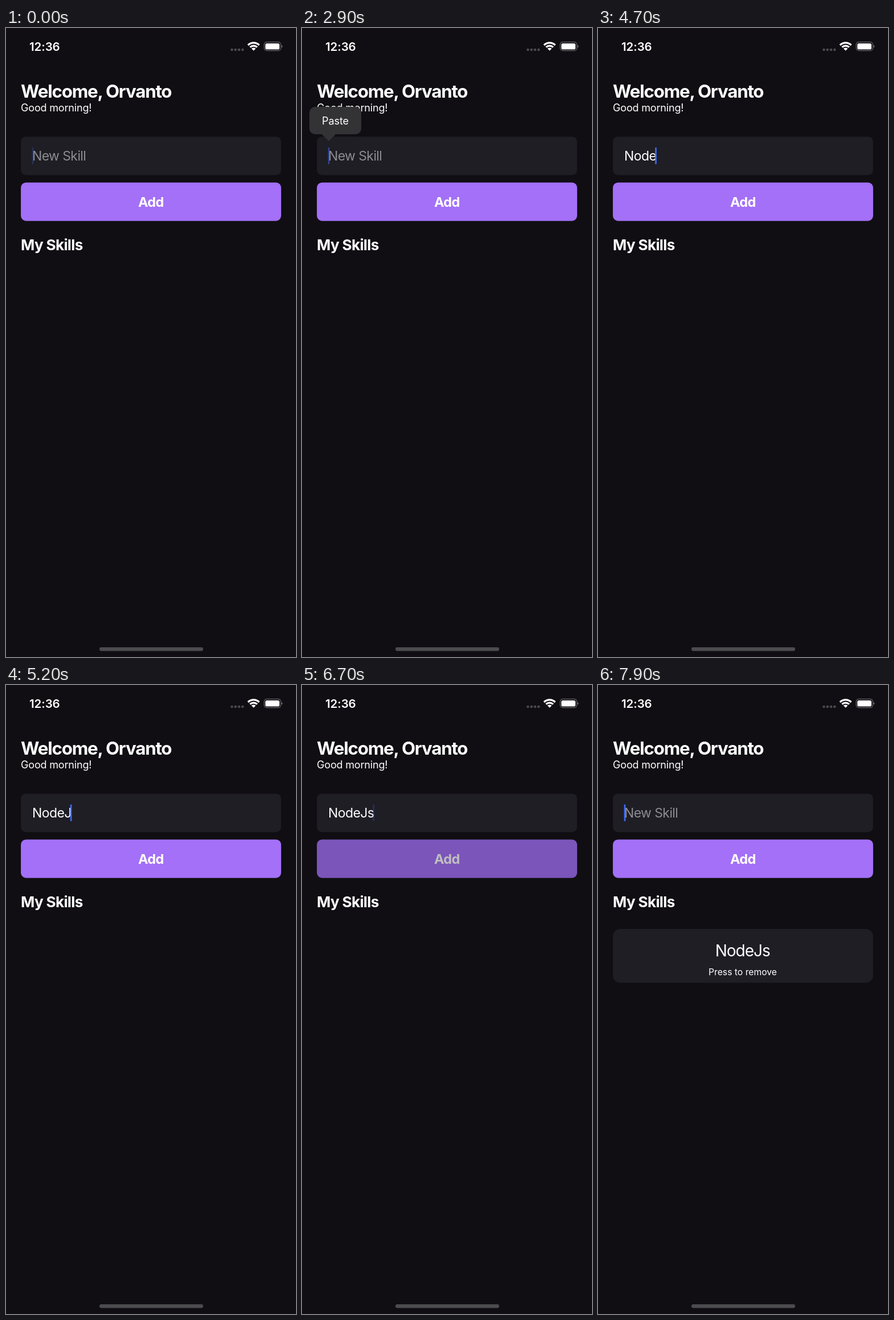
These frames come from a looping animation (509 by 1101 pixels, 8 s). An HTML page:

```html
<!DOCTYPE html>
<html lang="en">
<meta charset="utf-8">
<title>My Skills</title>
<style>
  html, body { margin: 0; width: 100%; height: 100%; overflow: hidden; background: #100e13; }
  svg { display: block; width: 509px; height: 1101px; font-family: Inter, Roboto, sans-serif; fill: #fff; }
  .bold { font-weight: 700; }
  .mid { text-anchor: middle; }
  .panel { fill: #1f1e25; }
  .accent { fill: #3e6af5; }
</style>
<svg viewBox="0 0 509 1101">
  <text x="41" y="39.5" font-size="20.5" font-weight="600" letter-spacing="-.1">12:36</text>
  <path d="M396.5 38h19" stroke="#4b4a4e" stroke-width="4.6" stroke-linecap="round" stroke-dasharray="0 6.25"/>
  <g fill="none" stroke="#fff" stroke-width="3.3">
    <path d="M424.8 30a13.9 13.9 0 0 1 19.6 0M428.4 33.6a8.8 8.8 0 0 1 12.4 0"/>
    <path d="M430.8 36a5.4 5.4 0 0 1 7.6 0L434.6 39.8z" fill="#fff" stroke="none"/>
  </g>
  <rect x="453.2" y="24.7" width="29.2" height="14.9" rx="4.5" fill="none" stroke="#6b6a6e" stroke-width="1.2"/>
  <rect x="455.2" y="27" width="24.8" height="10.6" rx="2.6"/>
  <path d="M483.6 29.8q1.8 .8 1.8 2.4t-1.8 2.4z" fill="#6b6a6e"/>

  <text class="bold" x="26" y="121.5" font-size="31.3" letter-spacing="-1.2">Welcome, Orvanto</text>
  <text x="26" y="146" font-size="18" letter-spacing="-.17">Good morning!</text>

  <rect class="panel" x="26.1" y="190.2" width="456.8" height="67.2" rx="9.1"/>
  <rect id="mark" class="accent" x="42" y="208" width="63" height="32" rx="4"/>
  <text id="field" x="46" y="232" font-size="23" letter-spacing="-.6"></text>
  <rect id="caret" class="accent" y="209" width="2.7" height="29.5" rx="1.3"/>

  <g id="button">
    <rect x="26.1" y="270.4" width="456.8" height="67.3" rx="9.1" fill="#a370f7"/>
    <text class="bold mid" x="254.4" y="312.5" font-size="23.5" letter-spacing="-.6">Add</text>
  </g>
  <text class="bold" x="26" y="389" font-size="26.1" letter-spacing="-.65">My Skills</text>

  <g id="card">
    <rect class="panel" x="26.1" y="427" width="456.8" height="94.3" rx="13"/>
    <text class="mid" x="253.7" y="475" font-size="28" letter-spacing="-1">NodeJs</text>
    <text class="mid" x="254" y="507.5" font-size="15.7">Press to remove</text>
  </g>

  <g id="menu">
    <path d="M23 138H94a10 10 0 0 1 10 10V176a10 10 0 0 1-10 10H59L47 198 35 186H23a10 10 0 0 1-10-10V148a10 10 0 0 1 10-10z" fill="#333235"/>
    <text class="mid" x="58.5" y="168.5" font-size="18" letter-spacing="-.1">Paste</text>
  </g>
  <rect x="164" y="1084" width="182" height="6.5" rx="3.25" fill="#4c4b4e"/>
</svg>
<script>
  const LOOP = 8000, STEP = 100, BLINK = 1000;
  const WORD = 'NodeJs', KEYS = [3900, 4300, 4600, 4700, 5200, 5800];
  const TAP = 2300, ADD = 6800;
  // The caret starts a new blink cycle at each of these moments.
  const RESETS = [-900, TAP, ...KEYS, ADD];
  const [mark, field, caret, button, card, menu] =
    ['mark', 'field', 'caret', 'button', 'card', 'menu'].map(id => document.getElementById(id));

  const ramp = (t, from, to) => Math.min(1, Math.max(0, (t - from) / (to - from)));
  const show = (node, opacity) => node.setAttribute('opacity', opacity);

  function blink(t) {
    const age = (t - RESETS.filter(time => time <= t).pop()) % BLINK;
    return 1 - ramp(age, 500, 700) + ramp(age, 850, 1050);
  }

  function draw() {
    const t = Math.floor(performance.now() % LOOP / STEP) * STEP;
    const added = t >= ADD;
    const text = added ? '' : WORD.slice(0, KEYS.filter(time => time <= t).length);
    field.textContent = text || 'New Skill';
    field.setAttribute('fill', text ? '#fff' : '#8c8b91');
    caret.setAttribute('x', text ? 44 + field.getComputedTextLength() : 45.7);
    show(caret, blink(t));
    show(menu, ramp(t, TAP - 100, TAP + 200) - ramp(t, KEYS[0], KEYS[0] + 300));
    show(button, 1 - .8 * (ramp(t, ADD - 150, ADD) - ramp(t, ADD, ADD + 250)));
    show(mark, t >= 4900 && text === 'Node' ? .3 : 0);
    show(card, added ? 1 : 0);
    requestAnimationFrame(draw);
  }
  draw();
</script>
</html>
```
